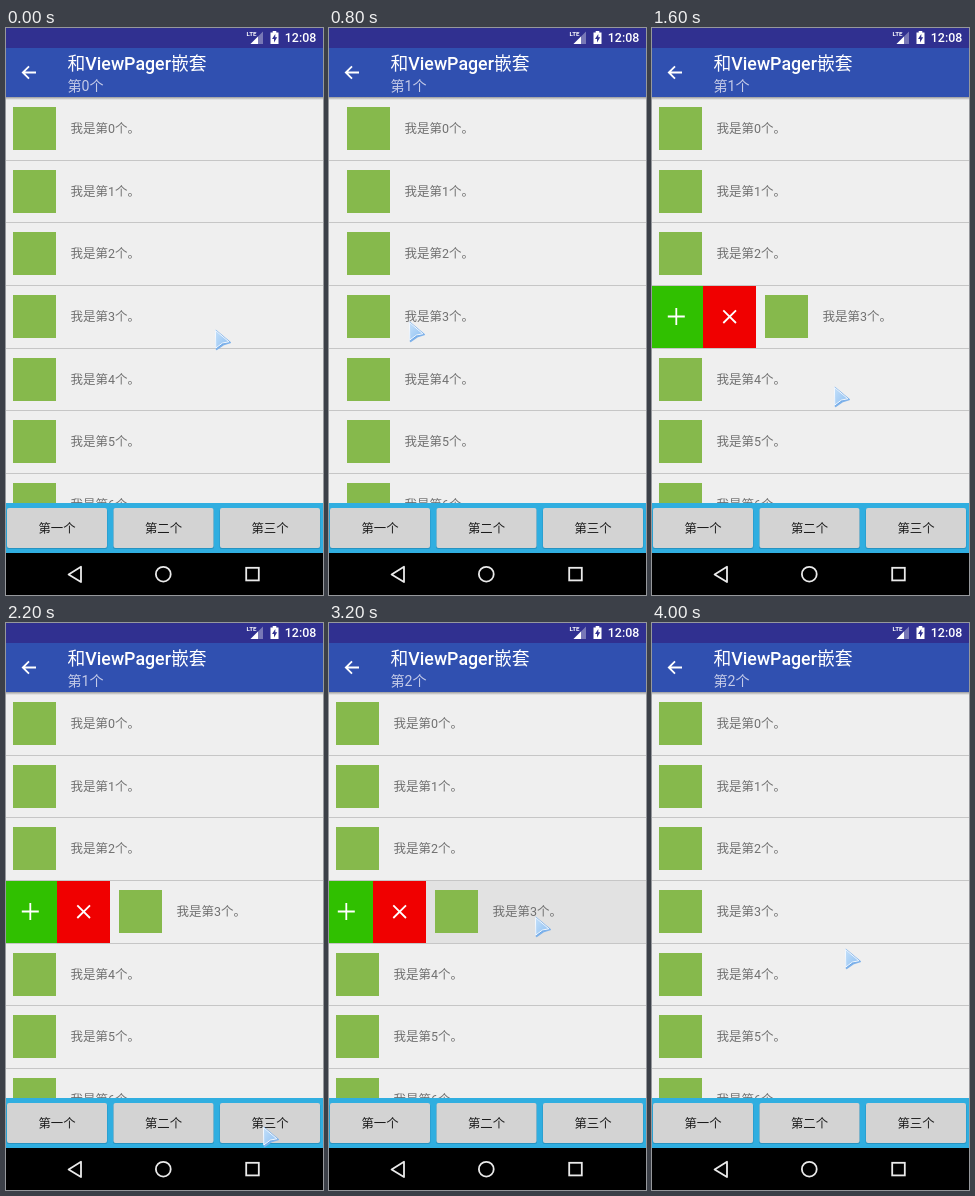
These frames come from a looping animation (317 px wide and 567 px high, 4200 ms). An HTML page:

```html
<!DOCTYPE html>
<html lang="zh">
<head>
<meta charset="utf-8">
<title>和ViewPager嵌套</title>
<style>
  html, body { margin: 0; width: 100%; height: 100%; overflow: hidden; background: #efefef; }
  svg { display: block; width: 100vw; height: 100vh; }
  text { font-family: Roboto, "Noto Sans CJK SC", "Noto Sans CJK", sans-serif; }
  .item { font-size: 12.5px; fill: #707070; }
  .title { font-size: 17.8px; font-weight: 500; fill: #fff; }
  .sub { font-size: 14.1px; fill: #c5cbe8; }
  .label { font-size: 12.4px; font-weight: 500; fill: #1c1c1c; text-anchor: middle; }
  .clock { font-size: 12.4px; font-weight: 500; fill: #fff; }
  .lte { font-size: 6.2px; font-weight: 700; fill: #fff; }
  .line { fill: none; stroke: #fff; stroke-width: 1.8; }
  .nav { fill: none; stroke: #eaeaea; stroke-width: 1.8; }
</style>
</head>
<body>
<svg viewBox="0 0 317 567" preserveAspectRatio="none">
  <defs>
    <linearGradient id="shade" x2="0" y2="1">
      <stop offset="0" stop-color="#000" stop-opacity=".35"/>
      <stop offset="1" stop-color="#000" stop-opacity="0"/>
    </linearGradient>
    <linearGradient id="ice" x2="1" y2="1">
      <stop offset="0" stop-color="#c4e0fa"/>
      <stop offset="1" stop-color="#8fc0f2"/>
    </linearGradient>
  </defs>

  <rect width="317" height="567" fill="#efefef"/>
  <rect id="tint" y="258" width="317" height="62" fill="#e2e2e2"/>
  <g id="prev"></g>
  <g id="page"></g>
  <g id="rules" fill="#c6c6c6"></g>

  <rect y="69" width="317" height="3" fill="url(#shade)"/>
  <rect y="20" width="317" height="49" fill="#3050b0"/>
  <rect width="317" height="20" fill="#303090"/>
  <path class="line" d="M30 44.5H17M23 38.3L16.8 44.5L23 50.7"/>
  <text class="title" x="61.5" y="42.3">和ViewPager嵌套</text>
  <text class="sub" id="sub" x="61.5" y="62.6"></text>

  <path d="M257 3.5V16H244.5Z" fill="#fff" opacity=".35"/>
  <path d="M252 8.5V16H244.5Z" fill="#fff"/>
  <text class="lte" x="240.5" y="8">LTE</text>
  <path d="M264.5 4.5H266.7V3H270.3V4.5H272.5V16H264.5Z" fill="#fff"/>
  <path d="M269.3 6L266 11H268V14.5L271.2 9.3H269.3Z" fill="#303090"/>
  <text class="clock" x="278.8" y="14">12:08</text>

  <rect y="475" width="317" height="50" fill="#30aee0"/>
  <g id="buttons"></g>
  <rect y="525" width="317" height="42" fill="#000"/>
  <path class="nav" d="M75 538.8V554L62.6 546.4Z" stroke-linejoin="round"/>
  <circle class="nav" cx="157.3" cy="546.2" r="7.4"/>
  <rect class="nav" x="240.2" y="539.8" width="12.6" height="12.6"/>

  <g id="pointer" stroke-linejoin="round">
    <path d="M1.8 1.6L16.2 13.6L9.8 15.4L2.6 20.4Z" fill="#5f9fe4" stroke="#7fb2ea" stroke-width="1.6"/>
    <path d="M1.4 1.4L14.8 12.8L8.6 14L1.8 19Z" fill="url(#ice)" stroke="#f4f9ff" stroke-width="1"/>
  </g>
</svg>
<script>
const $ = id => document.getElementById(id);
const STEP = 200, WIDTH = 317, OPEN = 106, SWIPED = 3;
const rowTop = k => Math.floor(69.5 + 62.67 * k);

const menu = `<g class="menu" transform="translate(${-OPEN} 0)">
  <rect width="51" height="62" y="1" fill="#30c000"/>
  <rect x="51" width="53" height="62" y="1" fill="#f00000"/>
  <path class="line" d="M15.8 31.5H32.8M24.3 23V40"/>
  <path class="line" d="M71.3 25.3L84 38M84 25.3L71.3 38"/></g>`;

const row = k => `<g transform="translate(0 ${rowTop(k)})"><g class="row${k}">
  <rect x="7" y="10" width="43" height="43" fill="#86b94c"/>
  <text class="item" x="64.5" y="36.3">我是第${k}个。</text></g></g>`;

const rows = [...Array(7).keys()];
$("prev").innerHTML = $("page").innerHTML = rows.map(row).join("");
$("rules").innerHTML = rows.slice(1)
  .map(k => `<rect y="${rowTop(k)}" width="${WIDTH}" height="1"/>`).join("");
$("buttons").innerHTML = [..."一二三"].map((c, i) => {
  const x = 1 + 106.5 * i;
  return `<rect x="${x - 0.5}" y="481" width="101" height="40" rx="2" fill="#1d7ba3" opacity=".5"/>
  <rect class="btn" x="${x}" y="480" width="100" height="40" rx="2" fill="#d3d3d3"/>
  <text class="label" x="${x + 50}" y="504.6">第${c}个</text>`;
}).join("");

// pointer position at each step
const path = [
  [208, 301], [242, 294], [84, 294], [78, 293], [79, 293], [79, 293], [105, 293],
  [185, 293], [181, 358], [196, 492], [255, 507], [256, 503], [260, 502], [252, 384],
  [159, 332], [96, 293], [205, 293], [260, 292], [268, 292], [205, 293], [192, 325]
];
const scroll = { 2: 210, 3: 85, 4: 11, 5: 1, 12: 12 };
const swipe = { 6: 22, 7: 104, 16: 99, 17: OPEN, 18: OPEN, 19: 45 };
const dragging = [7, 16, 19];

const swiped = $("page").querySelector(".row" + SWIPED);
swiped.insertAdjacentHTML("afterbegin", menu);
const swipeMenu = swiped.querySelector(".menu");
const third = document.querySelectorAll(".btn")[2];
const move = (el, x, y = 0) => el.setAttribute("transform", `translate(${x} ${y})`);
const show = (el, on) => el.setAttribute("visibility", on ? "visible" : "hidden");

function draw(now) {
  const i = Math.floor(now / STEP) % path.length;
  const x = scroll[i] || 0;
  const slide = i >= 8 && i < 12 ? OPEN : swipe[i] || 0;
  move($("pointer"), ...path[i]);
  move($("page"), x);
  move($("prev"), x - WIDTH);
  // page 1 leaves with its menu open, page 2 arrives closed
  move(swiped, i < 12 || i > 15 ? slide : 0);
  show(swipeMenu, slide > 0);
  show($("tint"), dragging.includes(i));
  $("sub").textContent = `第${i < 3 ? 0 : i < 12 ? 1 : 2}个`;
  third.setAttribute("fill", i === 12 || i === 13 ? "#c1c1c1" : "#d3d3d3");
}

const start = performance.now();
function tick() {
  draw(Math.max(0, performance.now() - start));
  requestAnimationFrame(tick);
}
tick();
</script>
</body>
</html>
```
